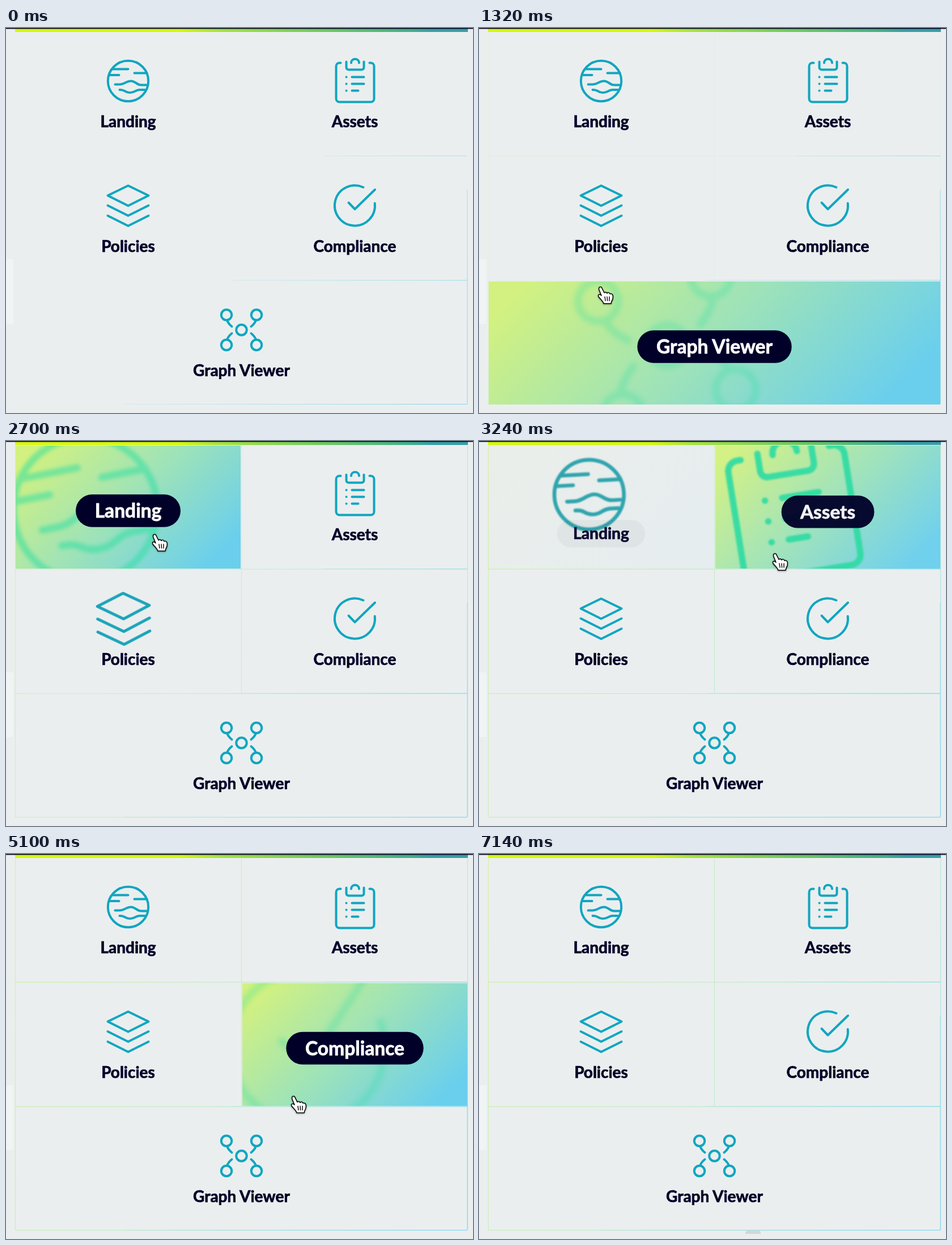
Recreate the animation shown at these times as an HTML page. Size 824 px wide and 679 px high, loop 7200 ms.

```html
<!DOCTYPE html>
<html lang="en">
<head>
<meta charset="utf-8">
<title>Tile menu</title>
<style>
  html, body { margin: 0; width: 100%; height: 100%; overflow: hidden; background: #ebeeef; }
  svg { display: block; }
  #stage { width: 824px; height: 679px; }
  text { font: 700 28px Lato, sans-serif; text-anchor: middle; stroke-width: .7; }
  .icon { fill: none; stroke-linecap: round; stroke-linejoin: round; }
</style>
</head>
<body>
<svg id="stage" viewBox="0 0 824 679">
  <defs>
    <linearGradient id="bar">
      <stop offset=".36" stop-color="#d5f80a"/>
      <stop offset=".45" stop-color="#a5e33c"/>
      <stop offset=".68" stop-color="#6cca5e"/>
      <stop offset=".88" stop-color="#3fae8c"/>
      <stop offset=".92" stop-color="#369fa8"/>
    </linearGradient>
    <linearGradient id="edge" gradientUnits="userSpaceOnUse" x1="150" y1="100" x2="814" y2="560">
      <stop offset=".3" stop-color="#8fe0da" stop-opacity="0"/>
      <stop offset="1" stop-color="#86d8ee"/>
    </linearGradient>
    <linearGradient id="trace" gradientUnits="userSpaceOnUse" x1="16" y1="100" x2="814" y2="560">
      <stop offset="0" stop-color="#cdf08c"/>
      <stop offset=".5" stop-color="#b4ecc0"/>
      <stop offset="1" stop-color="#8edcf0"/>
    </linearGradient>
  </defs>
  <rect width="824" height="679" fill="#ebeeef"/>
  <rect y="408" width="13" height="114" fill="#f1f4f4"/>
  <path id="traceLines" d="M415.5 8V444M16.5 8V663M16 226H814M16 445.5H814M16 663.5H814M814.5 8V663"
        fill="none" stroke="url(#trace)" stroke-width="1.3"/>
  <path d="M560 225.5H814M400 445H814M210 663.5H814M814 285V663" fill="none" stroke="url(#edge)"/>
  <g id="tiles"></g>
  <rect x="16" y="1" width="799" height="6" fill="url(#bar)"/>
  <rect width="824" height="1.6" fill="#0a0a24"/>
  <path id="smudge" d="M470 670V668Q471 664 475 664H492Q497 664 497 668V670Z" fill="#d3d7d7"/>
  <g id="cursor" stroke-linejoin="round" stroke-linecap="round">
    <path d="M-4 5C-6-1 0-2 1 2L5 10C7 8 9 9 10 11C11 9 14 9 15 12C17 11 19 12 20 14C21 18 20 22 18 25L17 29H4C3 25-1 22-5 17C-7 13-3 12-1 14L0 15Z"
          fill="#fff" stroke="#000" stroke-width="1.5"
          style="filter:drop-shadow(0 1.5px 1.5px rgba(0,0,0,.4))"/>
    <path d="M6 17l1 7M10 17l.6 7M14 17v7" stroke="#000" stroke-width="1.4"/>
  </g>
</svg>
<script>
const LOOP = 7200, STEP = 60;
const LABEL_MS = 300, ICON_MS = 500;
const NAVY = [0, 0, 40], WHITE = [255, 255, 255];
const TEAL = [15, 166, 192], SLATE = [47, 162, 173], GREEN = [46, 222, 162];
const NS = 'http://www.w3.org/2000/svg';

const shape = d => `<path d="${d}"/>`;

// one corner node of the graph, mirrored by the signs sx and sy
const node = (sx, sy) => `<g transform="scale(${sx} ${sy})">` +
  `<circle cx="26.5" cy="26.5" r="9.2"/>${shape('M25 16Q23 11 17 6')}</g>`;

const ICONS = {
  landing: '<circle r="35.7"/>' + shape('M-28-21H0M11-14H33M-34-10.5H-16' +
    'M-23 6H-15C-7 6-3 0 5 0S15 7 23 7H32M-15 15.5C-5 15-6 20.5 3 20.5S12 16 20 15.5H29'),
  assets: shape('M-25-32H-27A6 6 0 0 0-33-26V31A6 6 0 0 0-27 37H28A6 6 0 0 0 34 31V-26A6 6 0 0 0 28-32H26' +
    'M-15-34V-24A4 4 0 0 0-11-20H12A4 4 0 0 0 16-24V-34M-6.5-32C-6.5-41 7.5-41 7.5-32' +
    'M-15-7h.1M-15 5h.1M-15 17h.1M-5-7H16M-5 5H16M-5 17H6'),
  policies: shape('M0-35L36-17.5L0 .5L-36-17.5ZM-36 0L0 18L36 0M-36 18L0 36L36 18'),
  compliance: shape('M15-32A35.5 35.5 0 1 0 35.2-4M-11-5L0 6.5L35.5-28'),
  graph: '<circle r="9.2"/>' + node(1, 1) + node(-1, 1) + node(1, -1) + node(-1, -1)
};

// icon, label, column, row, columns spanned
const TILES = [
  ['landing', 'Landing', 0, 0, 1],
  ['assets', 'Assets', 1, 0, 1],
  ['policies', 'Policies', 0, 1, 1],
  ['compliance', 'Compliance', 1, 1, 1],
  ['graph', 'Graph Viewer', 0, 2, 2]
];

// key points of the fingertip: time, x, y
const PATH = [
  [840, 815, 600], [1320, 216, 457], [2220, 244, 258], [2700, 264, 165], [3240, 524, 199],
  [4000, 541, 226], [4200, 537, 300], [5230, 505, 446], [5700, 476, 656], [5760, 476, 690]
];

const clamp = v => Math.min(1, Math.max(0, v));
const mix = (a, b, p) => a + (b - a) * p;
const mixColor = (a, b, p) => a.map((v, i) => Math.round(mix(v, b[i], p)));
const bezier = (a, b, u) => 3 * a * u * (1 - u) ** 2 + 3 * b * u * u * (1 - u) + u ** 3;
const byId = id => document.getElementById(id);

function set(el, attrs) {
  for (const key in attrs) el.setAttribute(key, attrs[key]);
}

// cubic-bezier(.25, .1, .25, 1)
function ease(x) {
  if (x <= 0 || x >= 1) return clamp(x);
  let lo = 0, hi = 1;
  for (let i = 0; i < 24; i++) {
    const u = (lo + hi) / 2;
    if (bezier(.25, .25, u) < x) lo = u; else hi = u;
  }
  return bezier(.1, 1, lo);
}

function cursorAt(t) {
  const i = PATH.findIndex(k => k[0] > t);
  if (i < 1) return null;
  const [a, b] = [PATH[i - 1], PATH[i]];
  const p = (t - a[0]) / (b[0] - a[0]);
  return [mix(a[1], b[1], p), mix(a[2], b[2], p)];
}

// times at which the fingertip enters and leaves a box
function hoverSpans(x, y, w, h) {
  const spans = [];
  let inside = false;
  for (let t = 0; t < LOOP; t += 5) {
    const tip = cursorAt(t);
    const over = !!tip && Math.abs(tip[0] - x - w / 2) < w / 2 + 1 && Math.abs(tip[1] - y - h / 2) < h / 2 + 1;
    if (over && !inside) spans.push([t, LOOP]);
    if (!over && inside) spans[spans.length - 1][1] = t;
    inside = over;
  }
  return spans;
}

function hover(spans, t, duration) {
  return Math.max(...spans.map(([on, off]) =>
    t < off ? ease((t - on) / duration) : 1 - ease((t - off) / duration)));
}

function buildTile([name, label, col, row, span]) {
  const x = 17 + 400 * col, y = 8 + 219.5 * row, w = 400 * span - 3, h = 217;
  const cx = w / 2, cy = h / 2, reach = (w + h) / 4;
  const spans = hoverSpans(x, y, w, h);
  const svg = document.createElementNS(NS, 'svg');
  set(svg, { x, y, width: w, height: h });
  svg.innerHTML = `
    <linearGradient id="${name}Fill" gradientUnits="userSpaceOnUse"
      x1="${cx - reach}" y1="${cy - reach}" x2="${cx + reach}" y2="${cy + reach}">
      <stop offset=".07" stop-color="#d2f180"/>
      <stop offset=".45" stop-color="#a2e4b4"/>
      <stop offset=".9" stop-color="#6acfed"/>
    </linearGradient>
    <rect class="back" width="${w}" height="${h}" fill="url(#${name}Fill)"/>
    <g class="icon">${ICONS[name]}</g>
    <g class="label"><rect y="-24" height="48" rx="24" fill="rgb(${NAVY})"/><text y="10">${label}</text></g>`;
  byId('tiles').append(svg);
  const [back, icon, tag, pill, text] =
    ['.back', '.icon', '.label', '.label rect', 'text'].map(s => svg.querySelector(s));
  const pillWidth = text.getComputedTextLength() + 56;
  set(pill, { x: -pillWidth / 2, width: pillWidth });

  return t => {
    const lp = hover(spans, t, LABEL_MS), ip = hover(spans, t, ICON_MS);
    const rise = clamp(ip * 4), fade = clamp((ip - .7) / .3);
    const ink = `rgb(${mixColor(NAVY, WHITE, lp)})`;
    set(back, { opacity: lp });
    set(icon, {
      transform: `translate(${cx - 84 * ip} ${cy - 23 + 27 * lp}) rotate(${-12.4 * ip}) scale(${1 + 2.85 * ip})`,
      stroke: `rgb(${mixColor(mixColor(TEAL, SLATE, rise), GREEN, lp)})`,
      'stroke-width': 4 - .5 * ip,
      opacity: 1 - .72 * fade
    });
    icon.style.filter = rise > .02 ? `blur(${.5 * rise + .6 * fade}px)` : 'none';
    set(tag, { transform: `translate(${cx} ${cy + 48.5 - 42 * lp}) scale(${1 + .2 * lp})` });
    set(pill, { opacity: lp });
    set(text, { fill: ink, stroke: ink });
  };
}

const tiles = TILES.map(buildTile);

function draw(t) {
  tiles.forEach(update => update(t));
  set(byId('traceLines'), { opacity: .7 * clamp((t - 800) / 2400) });
  set(byId('smudge'), { opacity: t >= PATH[PATH.length - 1][0] ? 1 : 0 });
  const tip = cursorAt(t);
  set(byId('cursor'), {
    visibility: tip ? 'visible' : 'hidden',
    transform: tip ? `translate(${tip})` : ''
  });
}

const start = performance.now();
function tick() {
  const t = (performance.now() - start) % LOOP;
  draw(Math.floor(t / STEP) * STEP);
  requestAnimationFrame(tick);
}
tick();
</script>
</body>
</html>
```
